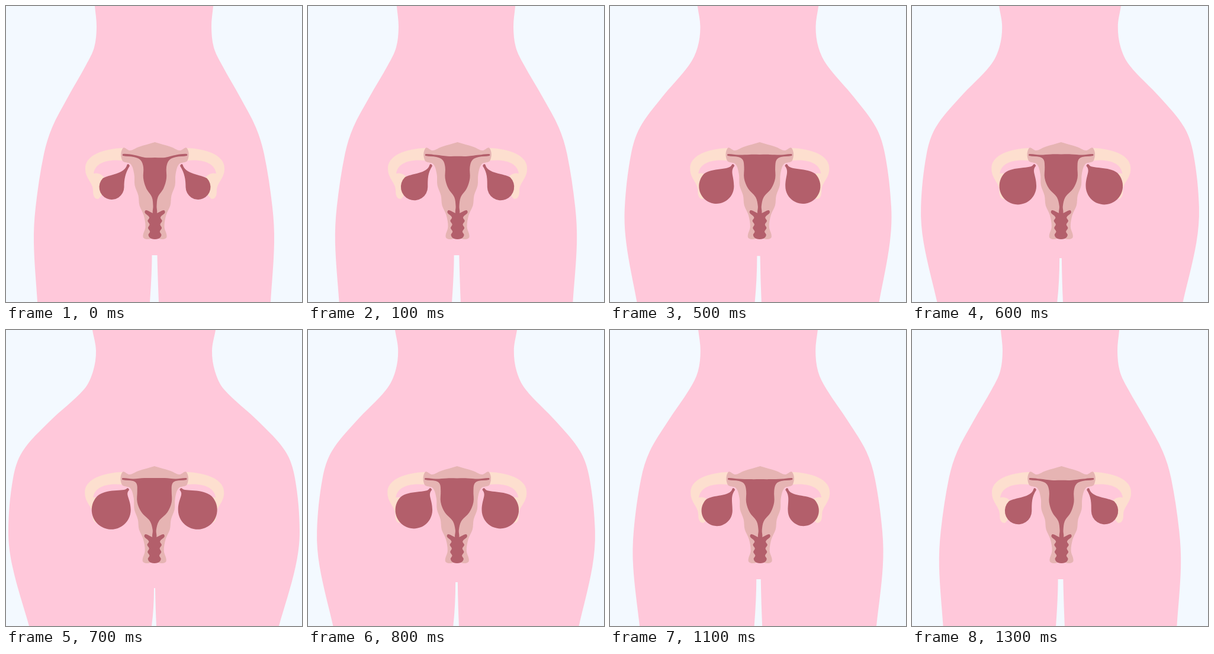
Recreate the animation shown at these times as an HTML page. Size 500 by 500 pixels, loop 1400 ms.

```html
<!DOCTYPE html>
<html lang="en">
<head>
<meta charset="utf-8">
<title>Uterus loop</title>
<style>
  html, body { margin: 0; width: 100%; height: 100%; overflow: hidden; background: #f3f9ff; }
  svg { display: block; width: 100vw; height: 100vh; }
  .bg { fill: #f3f9ff; }
  .skin { fill: #ffc8da; }
  .cream { fill: #fddfcf; }
  .wall { fill: #e6b4b3; }
  .dark { fill: #b35f6b; }
</style>
</head>
<body>
<svg id="stage" viewBox="0 0 500 500"></svg>
<script>
const STEP = 100, LAST = 7;   // ms per pose, widest pose
const AXIS = 251.5;           // middle of the organs
const svg = document.getElementById('stage');

const mix = (a, b, t) => a + (b - a) * t;
const path = (cls, d) => `<path class="${cls}" d="${d}"/>`;

// Closed smooth curve; a doubled point makes a sharp corner.
function smooth(pts) {
  const n = pts.length, at = i => pts[(i + n) % n];
  const dir = i => {
    const dx = at(i + 1)[0] - at(i - 1)[0], dy = at(i + 1)[1] - at(i - 1)[1];
    const len = Math.hypot(dx, dy) || 1;
    return [dx / len, dy / len];
  };
  let d = 'M' + pts[0];
  for (let i = 0; i < n; i++) {
    const a = at(i), b = at(i + 1), u = dir(i), v = dir(i + 1);
    const r = Math.hypot(b[0] - a[0], b[1] - a[1]) * 0.34;
    const c = [a[0] + u[0] * r, a[1] + u[1] * r, b[0] - v[0] * r, b[1] - v[1] * r];
    d += 'C' + [...c, ...b].map(x => x.toFixed(1));
  }
  return d + 'Z';
}

// Points are [distance from the axis, y], top to bottom, for both sides.
function mirrored(half, axis = AXIS) {
  const right = half.map(([x, y]) => [axis + x, y]);
  const left = half.map(([x, y]) => [axis - x, y]).reverse();
  return smooth([...right, ...left]);
}

// Each key point is [y, narrow half width, wide half width].
function hips(grow) {
  const half = [
    [0, 100, 104], [35, 97, 98], [70, 101, 103], [100, 115, 118], [155, 146, 177],
    [205, 172, 222], [250, 186, 238], [340, 200, 246], [400, 203, 239], [500, 197, 211]
  ].map(([y, a, b]) => [mix(a, b, grow), y]);
  return mirrored([half[0], ...half, half[half.length - 1]], 250);
}

function legGap(grow) {
  const w = mix(4.5, 1, grow), top = mix(421, 436, grow ** 4), low = mix(450, 470, grow);
  return `M${251 - w} ${top}H${251 + w}Q${251.5 + w} ${low} ${mix(258, 254, grow)} 500`
    + `H${mix(243, 246, grow)}Q${251 - w} ${low} ${251 - w} ${top}Z`;
}

const tube = 'M197 240C165 241 133 252 134 275C134 292 147 298 147 312C147 322 150 326 156 326'
  + 'L175 305C168 289 160 280 148 283C150 268 165 258 197 261Z';

// A round bulb hanging from a thin neck; it swells with t.
function ovary(t) {
  const r = mix(21, 33, t), cx = 178.5, cy = mix(306, 304, t);
  const x = cx - r * 0.71, y = cy - r * 0.71;
  return `M204.5 268C201 ${284 - 11 * t * t} ${x + 0.45 * r} ${y - (0.3 + 0.1 * t) * r} ${x} ${y}`
    + `A${r} ${r} 0 1 0 ${cx + r} ${cy}`
    + `C${cx + r} ${cy - 0.6 * r} 201 ${283 - 5 * t} 209 270Q207 265 204.5 268Z`;
}

const wall = mirrored([
  [0, 230], [27, 238], [42, 244], [54, 240], [55, 261], [41, 267], [35, 284], [34, 303],
  [28, 320], [26, 337], [19, 353], [16, 373], [20, 390], [13, 394], [0, 391]
]);

function cavity(t) {
  const top = 256 - 6 * Math.sqrt(t), belly = mix(19.5, 29, t);
  return mirrored([
    [0, top], [17, top], [36, 251.5], [54, 250], [54, 253], [36, 255],
    [mix(24.5, 30, t), 260], [belly, 272], [belly, 291], [belly * 0.75, 308],
    [mix(5, 7.5, t), 323], [3, 338], [3, 352]
  ]);
}

// Two lobes on top, then alternating notches and bumps.
function cervix() {
  const half = [[3, 350], [15, 345], [17, 349]];
  for (let k = 0; k < 6; k++) half.push([9.5 + (k % 2) * 3 - k * 0.3, 357 + 6 * k]);
  half.push([6, 393]);
  return mirrored(half);
}

function scene(p) {
  const t = p / LAST, grow = t ** 1.8, sway = 2.2 * Math.sin(p / 2);
  const pair = (cls, d) => path(cls, d)
    + `<g transform="translate(${2 * AXIS} 0) scale(-1 1)">${path(cls, d)}</g>`;
  return path('skin', hips(grow)) + path('bg', legGap(grow))
    + `<g transform="translate(${sway} 0)">`
    + pair('cream', tube) + path('wall', wall) + pair('dark', ovary(t))
    + path('dark', cavity(t)) + path('dark', cervix()) + '</g>';
}

let shown = -1;
const start = performance.now();

// The poses run up to the widest one and back again.
function tick() {
  const i = Math.floor((performance.now() - start) / STEP) % (2 * LAST);
  const p = LAST - Math.abs(LAST - i);
  if (p !== shown) svg.innerHTML = scene(shown = p);
  requestAnimationFrame(tick);
}
tick();
</script>
</body>
</html>
```
